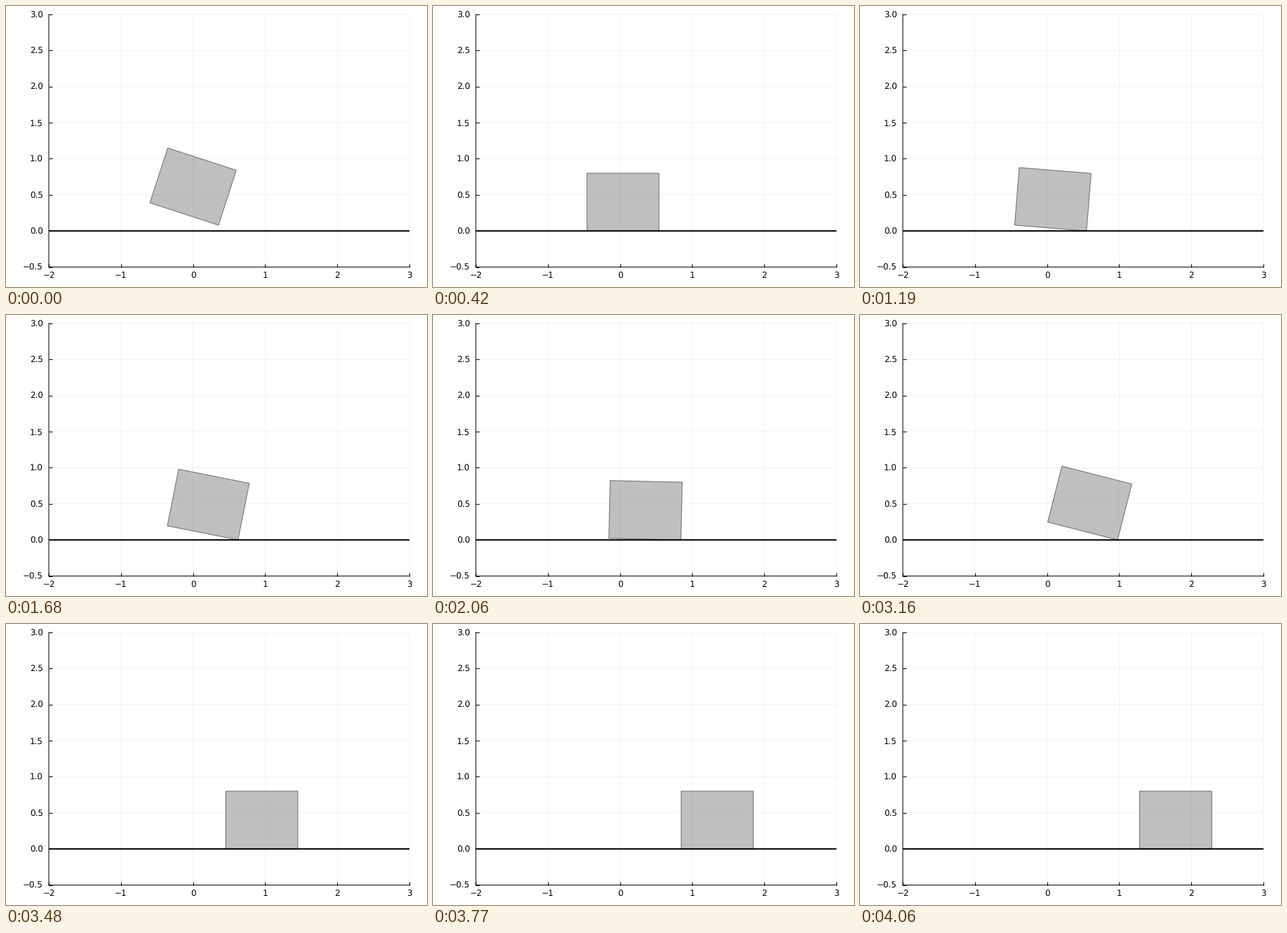
These frames come from a looping animation (600x400 px, 4090 ms). A matplotlib script:

```python
import numpy as np
import matplotlib.pyplot as plt
from matplotlib.animation import FuncAnimation
from matplotlib.patches import Polygon

LOOP_MS, STEPS = 4090, 127
FRAMES = 2 * STEPS
WIDTH, HEIGHT = 1.0, 0.8
PX = 0.72  # points per pixel at 100 dpi

plt.rcParams.update({"font.family": "DejaVu Sans", "path.snap": False,
                     "text.hinting": "none"})

# centre of the box along the ground: step, x
PATH_K = [18, 19, 45, 48, 53, 55, 58, 63, 64, 90, 93, 98, 108, 115, 126]
PATH_X = [0.04, 0.049, 0.094, 0.095, 0.24, 0.29, 0.343, 0.343, 0.353, 0.396,
          0.398, 0.5915, 0.952, 1.25, 1.783]


def drop(k):
    """Free fall on one corner, then topple flat: centre x, clearance, tilt."""
    x = 0.04 * (1 - (1 - min(k / 13, 1)) ** 2)
    lift = 0.08 * max(0, 1 - (k / 4) ** 2)
    u = np.clip((k - 4) / 6, 0, 1)
    return x, lift, 18 * (1 - 0.55 * u - 0.45 * u * u)


def hop(k, start, peak, top, land):
    """Slow tilt in double steps, a kick up to the top angle, then a fall."""
    if k < start:
        return k, 0
    rest = start + 26
    if k < rest + 3:
        k = min(start + (k - start) // 2 * 2, rest)
        return k, 1.315 + 0.365 * (k - start) / 2
    if k <= peak:
        low = 1.315 + 0.365 * 13
        s = (peak - k) / (peak - rest - 3)
        return k, top - (top - low) * s * s
    return k, top * max(0, 1 - ((k - peak) / (land - peak)) ** 2)


def pose(k):
    if k < 19:
        return drop(k)
    if k < 64:
        k, tilt = hop(k, 19, 53, 11.5, 58)
    else:
        k, tilt = hop(k, 64, 98, 14.3, 104)
    return np.interp(k, PATH_K, PATH_X), 0, tilt


def corners(x, lift, tilt):
    a = np.radians(tilt)
    c, s = np.cos(a), np.sin(a)
    w, h = WIDTH / 2, HEIGHT / 2
    local = np.array([(-w, -h), (w, -h), (w, h), (-w, h)])
    turned = local @ np.array([(c, -s), (s, c)])
    return turned + (x, lift + w * s + h * c)


fig = plt.figure(figsize=(6, 4), dpi=100, facecolor="white")
left, right, top, bottom = 61.04, 575.04, 11.81, 371.61
ax = fig.add_axes([left / 600, 1 - bottom / 400,
                   (right - left) / 600, (bottom - top) / 400])
ax.set(xlim=(-2, 3), ylim=(-0.5, 3),
       xticks=np.arange(-2, 4), yticks=np.arange(-0.5, 3.1, 0.5))
ax.set_axisbelow(True)
ax.grid(color="black", alpha=0.1, linewidth=0.5 * PX)
for line in ax.get_xgridlines() + ax.get_ygridlines():
    line.set_clip_on(False)
ax.tick_params(direction="in", length=4.7 * PX, width=PX, labelsize=11.85 * PX)
ax.tick_params(axis="x", pad=6.7 * PX)
ax.tick_params(axis="y", pad=8 * PX)
for side in ("top", "right"):
    ax.spines[side].set_visible(False)
for side in ("left", "bottom"):
    ax.spines[side].set_linewidth(PX)

box = ax.add_patch(Polygon(corners(*pose(0)), closed=True,
                           facecolor=(0.5, 0.5, 0.5, 0.5),
                           edgecolor=(0, 0, 0, 0.5),
                           linewidth=PX, zorder=3))
ax.plot([-2, 3], [0, 0], color="black", linewidth=2 * PX,
        solid_capstyle="butt", zorder=4)


def update(i):
    step = min((i + 1) // 2, STEPS - 1)
    box.set_xy(corners(*pose(step)))
    return (box,)


anim = FuncAnimation(fig, update, frames=FRAMES, interval=LOOP_MS / FRAMES,
                     repeat=True, repeat_delay=0, blit=False)
plt.show()
```
